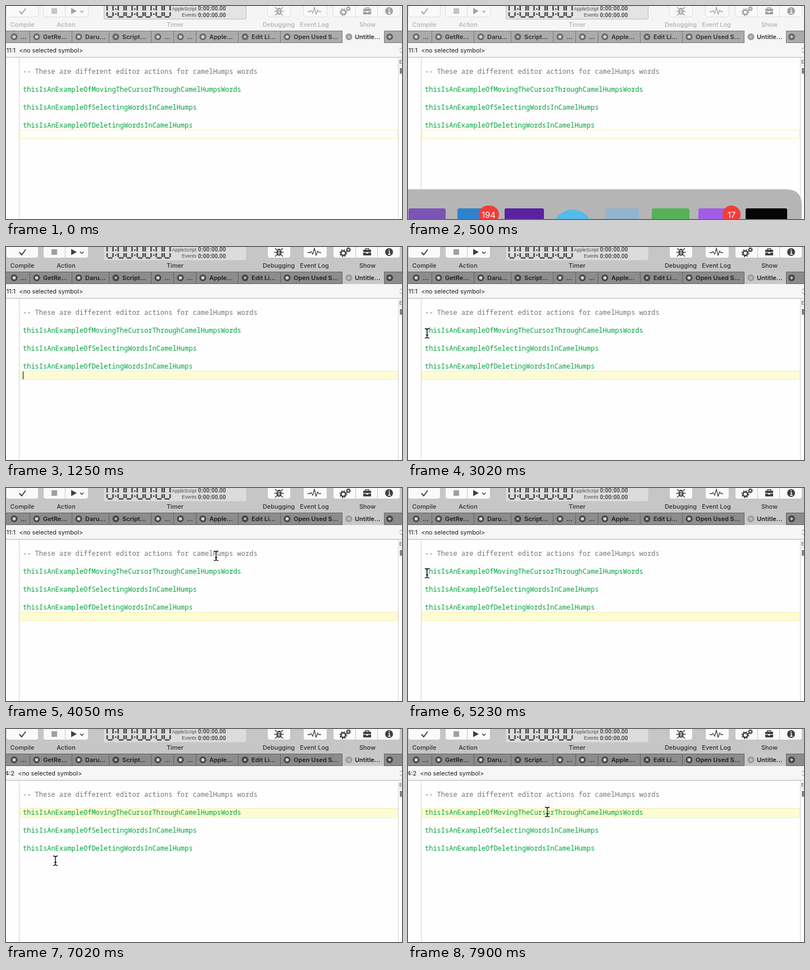
An HTML page that plays this animation: 705x380 px, repeating every 8 s.

```html
<!DOCTYPE html>
<html lang="en">
<head>
<meta charset="utf-8">
<title>Camel humps editor</title>
<style>
  html, body { margin: 0; width: 100%; height: 100%; overflow: hidden; background: #fefefe; }
  svg { display: block; width: 705px; height: 380px; }
  #stage {
    --bar: #f5f5f5; --button: #f9f9f9; --edge: #dedede; --icon: #a2a2a2; --stop: #c4c4c4;
    --label: #b2b2b2; --lcd: #e4e4e4; --lcd-edge: #bdbdbd; --tabs: #acaaab; --tab-edge: #777;
    --tab-text: #303030; --tab-icon: #666; --current: #f5f5f5; --line: #fefefe;
  }
  #stage.active {
    --bar: #c6c6c6; --button: #fafafa; --edge: #c2c2c2; --icon: #3f3f3f; --stop: #a0a0a0;
    --label: #303030; --lcd: #dcdcdc; --lcd-edge: #d2d2d2; --tabs: #8d8b8c; --tab-edge: #626262;
    --tab-text: #202020; --tab-icon: #444; --current: #c8c8c8; --line: #fdfcd5;
  }
  text { font-family: Inter, "Noto Sans", sans-serif; white-space: pre; }
  .label { font-size: 10.9px; font-weight: 500; fill: var(--label); text-anchor: middle; }
  .tab { font-size: 11px; font-weight: 600; fill: var(--tab-text); }
  .symbol { font-size: 10.8px; fill: #1d1d1d; }
  .lcd { font: 8.5px "Liberation Sans", Arial, sans-serif; fill: #4a4a4a; text-anchor: end; }
  .time { font-size: 10.3px; font-weight: bold; }
  .code { font: 500 12px "Noto Sans Mono", "DejaVu Sans Mono", monospace; fill: #00a33e; }
  .comment { font-weight: 400; fill: #777; }
  .button { fill: var(--button); stroke: var(--edge); }
  .fill { fill: var(--icon); }
  .draw { fill: none; stroke: var(--icon); stroke-width: 1.5; stroke-linejoin: round; }
  .badge { font-size: 15px; fill: #fff; text-anchor: middle; }
</style>
</head>
<body>
<svg id="stage" viewBox="0 0 705 380">
  <rect width="705" height="380" fill="#fefefe"/>
  <rect width="705" height="44" fill="var(--bar)"/>

  <g id="buttons"></g>
  <g class="draw">
    <path d="M24 9.5l4 4.5 7-9.500" stroke-width="1.900"/>
    <path d="M132 8.500l3 3 3-3"/>
    <path d="M537 10h4l2-2 3 5 3-11 3 13 3-8 2 3h4" stroke-width="1.300"/>
    <path d="M640 5V3h6v2"/>
  </g>
  <rect x="81" y="4" width="10" height="10" fill="var(--stop)"/>
  <path class="fill" d="M116 3.500l10 5.500-10 5.500z"/>
  <g>
    <ellipse class="fill" cx="486" cy="9.500" rx="4.500" ry="6.500"/>
    <path class="draw" stroke-width="1" d="M479 2l4 4M493 2l-4 4M477.500 9.500h17M479 17l4-4M493 17l-4-4"/>
    <path d="M483 6.500h6M486 7v8M483.500 10.500h5" stroke="var(--button)" fill="none"/>
  </g>
  <g class="draw">
    <circle cx="600.500" cy="11" r="4" stroke-width="2.500"/>
    <circle cx="600.500" cy="11" r="6" stroke-width="1.800" stroke-dasharray="2.300 2.410"/>
    <circle cx="609.500" cy="5" r="2.300" stroke-width="1.800"/>
    <circle cx="609.500" cy="5" r="3.800" stroke-width="1.400" stroke-dasharray="1.500 1.480"/>
  </g>
  <path class="fill" d="M636 5h14v4h-14zM636 10h5v1.500h4V10h5v5h-14z"/>
  <circle class="fill" cx="682" cy="9" r="7"/>
  <path d="M681 8h1.500v5M680 13h5M682 4v2" fill="none" stroke="var(--button)" stroke-width="1.600"/>

  <path d="M174.500-2V21q0 2.500 2.500 2.500H425q2.500 0 2.500-2.500V-2z" fill="var(--lcd)" stroke="var(--lcd-edge)"/>
  <g id="digits" fill="none" stroke="#484848" stroke-width="2.600"></g>
  <text class="lcd" x="339" y="7.500">AppleScript</text>
  <text class="lcd" x="339" y="19">Events</text>
  <text class="lcd time" x="391.500" y="8">0:00:00.00</text>
  <text class="lcd time" x="391.500" y="19.500">0:00:00.00</text>
  <g id="labels"></g>

  <rect y="44" width="705" height="22" fill="var(--tabs)"/>
  <path d="M0 44.500H705M0 65.500H705" stroke="var(--tab-edge)"/>
  <g id="tabs"></g>

  <rect y="66" width="705" height="25" fill="#f6f6f6"/>
  <path d="M0 91.500H705" stroke="#b4b4b4"/>
  <text class="symbol" id="place" y="83" text-anchor="end"></text>
  <text class="symbol" id="symbol" y="83">&lt;no selected symbol&gt;</text>
  <path d="M701 77.500l3-3 3 3M701 80.500l3 3 3-3" fill="none" stroke="#777"/>

  <path d="M23.500 92V380M698.500 92V380" stroke="#d2d2d2"/>
  <text x="700" y="103" font-size="9" fill="#444">E</text>
  <path d="M699 106.500h6" stroke="#ccc"/>
  <path d="M701 112h4M701 114.500h4M701 117h4M701 119.500h4" stroke="#333" stroke-width="1.300"/>

  <rect id="line" x="25.500" y="221.500" width="671.500" height="15" fill="var(--line)" stroke="#f5efb0"/>
  <text class="code comment" x="30" y="121">-- These are different editor actions for camelHumps words</text>
  <text class="code" x="30" y="153">thisIsAnExampleOfMovingTheCursorThroughCamelHumpsWords</text>
  <text class="code" x="30" y="185">thisIsAnExampleOfSelectingWordsInCamelHumps</text>
  <text class="code" x="30" y="217">thisIsAnExampleOfDeletingWordsInCamelHumps</text>
  <rect id="caret" width="1" height="14" fill="#000"/>
  <g id="mouse" fill="none">
    <path d="M-4-8.500Q0-8.500 0-6Q0-8.500 4-8.500M0-7V7M-4 8.500Q0 8.500 0 6Q0 8.500 4 8.500M-2 3H2" stroke="#fff" stroke-width="2.600" opacity=".8"/>
    <path d="M-4-8.500Q0-8.500 0-6Q0-8.500 4-8.500M0-7V7M-4 8.500Q0 8.500 0 6Q0 8.500 4 8.500M-2 3H2" stroke="#000" stroke-width="1.300"/>
  </g>

  <g id="dock">
    <path d="M0 327H673Q701 327 701 355V380H0z" fill="#b5b5b5"/>
    <g id="apps"></g>
    <rect x="126" y="356" width="36" height="32" rx="16" fill="#f23d38"/>
    <text class="badge" x="143.500" y="377.500">194</text>
    <circle cx="576" cy="372" r="16" fill="#f23d38"/>
    <text class="badge" x="576" y="377.500">17</text>
  </g>
</svg>
<script>
const $ = id => document.getElementById(id);

function add(parent, tag, attrs, text = "") {
  const el = document.createElementNS("http://www.w3.org/2000/svg", tag);
  for (const key in attrs) el.setAttribute(key, attrs[key]);
  el.textContent = text;
  $(parent).append(el);
}

// Toolbar
for (const [x, w, ...splits] of [[0.5, 57], [66.5, 80, 105.5], [465.5, 41], [529.5, 42], [582.5, 119, 622.5, 661.5]]) {
  add("buttons", "rect", { class: "button", x, y: -6, width: w, height: 25.5, rx: 4 });
  for (const s of splits) add("buttons", "path", { d: `M${s} 0V19`, stroke: "var(--edge)" });
}
for (const [x, name] of [[29, "Compile"], [107, "Action"], [301, "Timer"], [485.5, "Debugging"], [549, "Event Log"], [643.5, "Show"]])
  add("labels", "text", { class: "label", x, y: 37 }, name);

// Timer digits, cut off by the top edge
let digitX = 180;
for (const c of "0:00:00:00") {
  const x = digitX, r = x + 10.5;
  add("digits", "path", { d: c === ":"
    ? `M${x} 5.5h2.5M${x} 14.5h2.5`
    : `M${x} 0V8M${r} 0V8M${x} 11V18M${r} 11V18M${x + 1} 19.500H${r - 1}` });
  digitX += c === ":" ? 5.5 : 14.2;
}

// Tabs: left edge, title, whether the close mark shows
const tabs = [[2, "..."], [42, "GetRe..."], [117, "Daru..."], [183, "Script...", 1], [258, "..."], [298, "..."],
  [338, "Apple..."], [413, "Edit Li...", 1], [488, "Open Used S..."], [598, "Untitle..."]];
tabs.forEach(([x, title, close], i) => {
  const last = i === tabs.length - 1, cx = x + 12.5;
  if (last) add("tabs", "rect", { x, y: 44, width: 75, height: 22, fill: "var(--current)" });
  if (i) add("tabs", "path", { d: `M${x + .5} 44V66`, stroke: "var(--tab-edge)" });
  add("tabs", "circle", { cx, cy: 55, r: close ? 6 : 4.5, fill: close ? "var(--tab-icon)" : last ? "#bbb" : "#d0d0d0",
    stroke: last ? "#999" : "var(--tab-icon)", "stroke-width": close ? 0 : 3 });
  if (close) add("tabs", "path", { d: `M${cx - 2} 53l4 4M${cx + 2} 53l-4 4`, stroke: "#ddd", "stroke-width": 1.3 });
  add("tabs", "text", { class: "tab", x: x + (last ? 23 : 24), y: 59 }, title);
});
add("tabs", "path", { d: "M673.5 44V66", stroke: "var(--tab-edge)" });
add("tabs", "circle", { cx: 683, cy: 55, r: 6, fill: "var(--tab-icon)" });
add("tabs", "path", { d: "M680 55h6M683 52v6", stroke: "#ddd", "stroke-width": 1.4 });

// Dock icons as plain shapes
for (const [x, width, fill] of [[1, 66, "#7b55b5"], [88, 58, "#2f82cf"], [172, 70, "#5a22a0"],
  [351, 60, "#92b4cf"], [434, 67, "#55b257"], [517, 66, "#a25be6"], [601, 74, "#050505"]])
  add("apps", "rect", { x, y: 361, width, height: 60, rx: 3, fill });
add("apps", "circle", { cx: 293, cy: 398, r: 35, fill: "#56bbe8" });

const moves = [
  [1690, 2720, 8, [[131, 236], [84, 198], [48, 166], [35, 155], [34, 154]]],
  [3020, 4050, 8, [[34, 154], [60, 150], [180, 136], [310, 121], [368, 118], [374, 121]]],
  [4350, 5230, 7, [[374, 121], [300, 127], [150, 143], [52, 155], [27, 156], [34, 152]]],
  [5530, 5680, 2, [[34, 152], [34, 151]]],
  [6130, 7160, 8, [[34, 151], [34, 151], [62, 200], [112, 262], [151, 296], [140, 309], [88, 235], [56, 158]]],
  [7310, 7900, 5, [[70, 152], [120, 151], [180, 150], [226, 149], [248, 148]]]
];

function pointer(t) {
  const move = moves.findLast(m => t >= m[0]);
  if (!move) return null;
  const [start, end, steps, path] = move;
  const step = Math.min(steps - 1, Math.floor((t - start + 8) * (steps - 1) / (end - start)));
  const k = step / (steps - 1) * (path.length - 1);
  const i = Math.min(Math.floor(k), path.length - 2);
  return path[i].map((v, axis) => v + (path[i + 1][axis] - v) * (k - i));
}

const CLICK = 6130;

function caretOn(t) {
  if (t < 1250) return false;
  return t < CLICK ? (t + 70) % 1030 >= 440 || t < 1990 : (t - CLICK) % 1030 < 590;
}

function show(id, on) { $(id).style.display = on ? "" : "none"; }

function draw(t) {
  const clicked = t >= CLICK, moved = t >= 6280, mouse = pointer(t);
  $("stage").classList.toggle("active", t >= 1100);
  show("dock", t >= 500 && t < 1100);
  show("caret", caretOn(t));
  show("mouse", mouse);
  if (mouse) $("mouse").setAttribute("transform", `translate(${mouse})`);
  $("line").setAttribute("y", clicked ? 141.5 : 221.5);
  $("line").setAttribute("height", clicked ? 16.5 : 15);
  $("caret").setAttribute("x", clicked ? 37 : 30);
  $("caret").setAttribute("y", clicked ? 143 : 222);
  $("place").textContent = moved ? "4:2" : "11:1";
  $("place").setAttribute("x", moved ? 15 : 17);
  $("symbol").setAttribute("x", moved ? 21.5 : 23.5);
}

const begin = performance.now();
function frame() {
  draw((performance.now() - begin) % 8000);
  requestAnimationFrame(frame);
}
frame();
</script>
</body>
</html>
```
